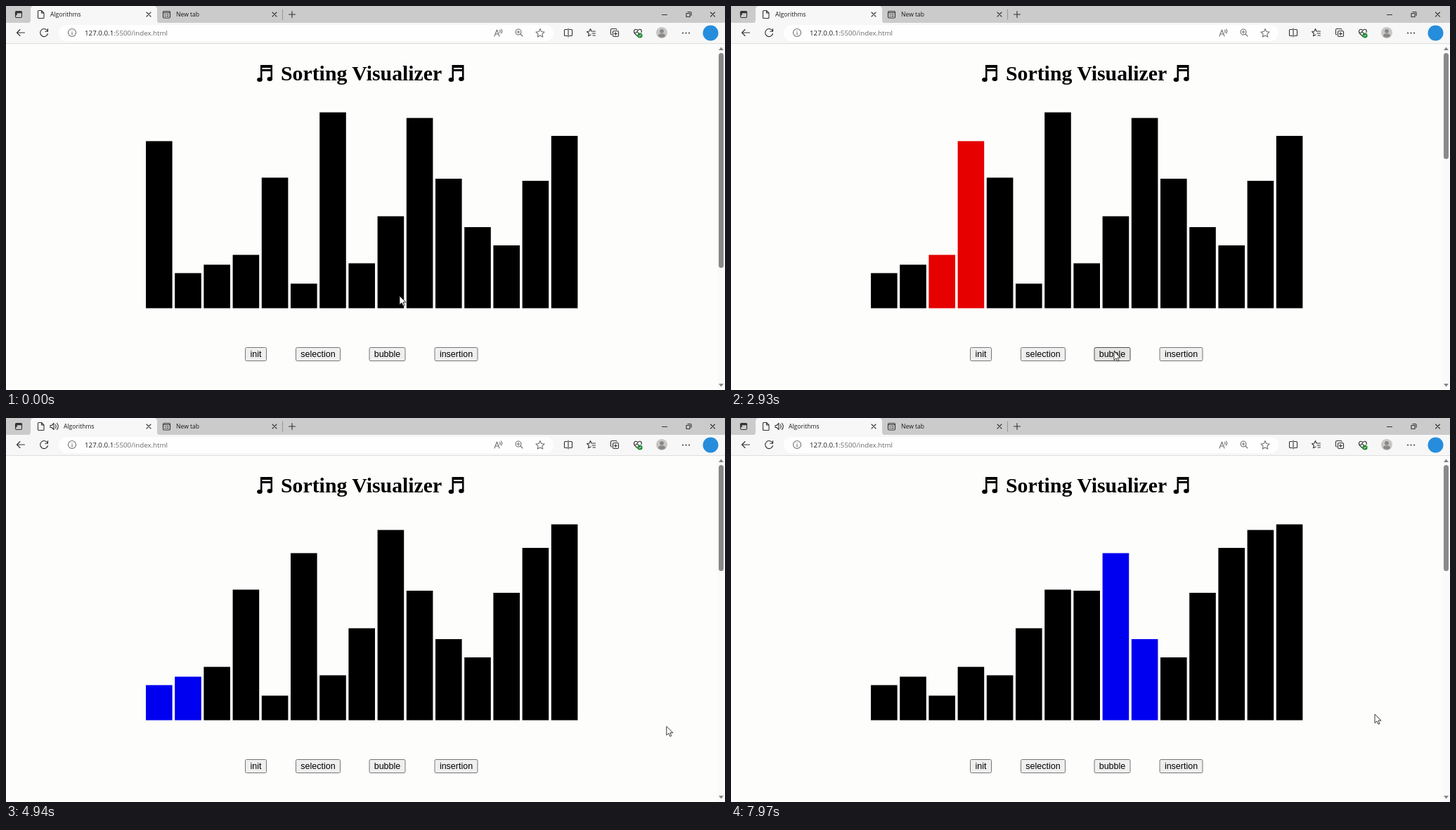
An HTML page for the animation above (8 s loop, 1023 px wide and 547 px high).

```html
<!DOCTYPE html>
<html lang="en">
<head>
<meta charset="utf-8">
<title>Sorting Visualizer</title>
<style>
  html, body { margin: 0; height: 100%; overflow: hidden; }
  svg { display: block; width: 1023px; height: 547px; background: #fdfdfc; }
  .ui { font-family: "Open Sans", "Noto Sans", sans-serif; font-size: 8.6px; fill: #1c1c1c; }
  .icon { fill: none; stroke: #333; stroke-width: 1.1; stroke-linecap: round; stroke-linejoin: round; }
  .soft { stroke: #707070; }
  h1, .title { font: bold 29.8px "Liberation Serif", "Times New Roman", serif; }
  .button rect { fill: #efefef; stroke: #767676; }
  .button text { font: 12.5px "Liberation Sans", Arial, sans-serif; text-anchor: middle; }
  .button.hover rect { fill: #e4e4e2; stroke: #4f4f4f; }
</style>
</head>
<body>
<svg viewBox="0 0 1023 547">
  <defs>
    <path id="cross" d="M-3-3L3 3M3-3L-3 3"/>
    <path id="star" d="M0-6L1.8-2L6-1.5L2.9 1.4L3.7 5.6L0 3.5L-3.7 5.6L-2.9 1.4L-6-1.5L-1.8-2Z"/>
    <g id="notes">
      <path d="M5 0H22V4H5ZM5 6H22V9H5ZM5 0H7.5V21H5ZM19.5 0H22V20H19.5Z"/>
      <ellipse cx="3.9" cy="21" rx="3.8" ry="3"/>
      <ellipse cx="18.3" cy="20" rx="3.8" ry="3"/>
    </g>
  </defs>

  <!-- tab strip -->
  <rect width="1023" height="25" fill="#cbcbcb"/>
  <rect y="24" width="1023" height="29" fill="#f7f7f7"/>
  <path d="M31 24.5Q35 24 35 20V5Q35 0 40 0H210Q215 0 215 5V20Q215 24 219 24.5Z" fill="#f7f7f7"/>
  <g class="icon">
    <rect x="13.5" y="7.5" width="9" height="9" rx="1.5"/>
    <path d="M14 9H22M14.5 9V12" stroke-width="2.4"/>
    <path d="M45.500 7.500Q45.500 6.500 46.500 6.500H50.500L54 10V16.500Q54 17.500 53 17.500H46.500Q45.500 17.500 45.500 16.500ZM50.500 6.500V10H54"/>
    <rect x="223.500" y="7.500" width="10" height="9.500" rx="1.500"/>
    <path d="M224 9.500H233M226 12H227M229 12H231M226 14.500H227M229 14.500H231"/>
    <use href="#cross" x="203" y="12"/>
    <use href="#cross" x="382" y="12"/>
    <path d="M402.500 12H411.500M407 7.500V16.500"/>
    <path d="M393.500 5V19" stroke="#999"/>
    <path d="M933.500 12.500H940.500M968 10.500H973V15.500H968ZM970 8.500H974Q975 8.500 975 9.500V13.500"/>
    <use href="#cross" x="1005.500" y="12"/>
  </g>
  <g class="ui">
    <text id="tabName" x="63" y="15">Algorithms</text>
    <text x="242" y="15">New tab</text>
  </g>
  <path id="speaker" class="icon" d="M63 10.500H65L68 7.500V16.500L65 13.500H63ZM70.500 9.500Q72 12 70.500 14.500M72.500 7.500Q76 12 72.500 16.500"/>

  <!-- toolbar -->
  <rect x="75" y="27" width="704" height="23" rx="11.500" fill="#fefefe"/>
  <path d="M0 53.500H1023" stroke="#dededc"/>
  <text class="ui" x="112" y="42" style="font-size:9.75px">127.0.0.1<tspan fill="#6a6a6a">:5500/index.html</tspan></text>
  <g class="icon">
    <path d="M26.500 38H15.500M20 33.500L15.500 38L20 42.500"/>
    <path d="M59.300 36A5.500 5.500 0 1 0 59.500 39.500M59.500 32.500V36.300H55.700"/>
    <g class="soft">
      <circle cx="94" cy="38" r="5.500"/>
      <path d="M94 37.500V41M94 35.300V35.400"/>
      <path d="M695 43L698.500 34L702 43M696.300 40H700.700M702.500 34.500Q704 36 702.500 38M704.500 33Q707 36 704.500 39"/>
      <circle cx="729" cy="37" r="4"/>
      <path d="M732 40L735 43M727 37H731M729 35V39"/>
      <use href="#star" x="760" y="38.500"/>
    </g>
    <path d="M798.500 33.500H795.500Q794.500 33.500 794.500 34.500V41.500Q794.500 42.500 795.500 42.500H798.500M801.500 33.500H804.500Q805.500 33.500 805.500 34.500V41.500Q805.500 42.500 804.500 42.500H801.500M800 32V44"/>
    <path d="M832 41L828.500 42.800L829.300 39L826.500 36.500L830 36L831.500 32.500L833 36H838.500M834 39H838.500M835 42H838.500"/>
    <rect x="863.500" y="35.500" width="8" height="8" rx="1.500"/>
    <path d="M861.500 41Q860.500 40.500 860.500 39.500V34Q860.500 32.500 862 32.500H867.500Q868.500 32.500 869 33.500M867.500 37.500V41.500M865.500 39.500H869.500"/>
    <path d="M898.500 43L894 38.500Q892.500 35.500 895 33.500Q897.500 32.500 899 35Q900.500 32.500 903 33.500Q905 35 904 37.500M894 38H897L898 36L900 39H901"/>
  </g>
  <circle cx="902" cy="42" r="3.600" fill="#218a35"/>
  <path d="M900.400 42L901.500 43.200L903.800 40.800" fill="none" stroke="#fff"/>
  <circle cx="933" cy="38" r="8" fill="#c9c7c5"/>
  <path d="M928 43Q928 39.500 931 39.500H935Q938 39.500 938 43Q933 47 928 43Z" fill="#8a8886"/>
  <circle cx="933" cy="35.800" r="2.900" fill="#8a8886"/>
  <path d="M963 38.500H963.100M967.500 38.500H967.600M972 38.500H972.100" stroke="#333" stroke-width="1.900" stroke-linecap="round"/>
  <circle cx="1002.500" cy="38.500" r="11" fill="#268ddc"/>

  <!-- page -->
  <use href="#notes" x="357" y="84"/>
  <text class="title" x="391" y="106">Sorting Visualizer</text>
  <use href="#notes" x="629.500" y="84"/>
  <g id="bars"></g>
  <g id="buttons"></g>

  <rect x="1012" y="54" width="11" height="493" fill="#fafafa"/>
  <path d="M1014 63L1017.500 58.500L1021 63ZM1014 538L1017.500 542.500L1021 538Z" fill="#858585"/>
  <rect id="thumb" x="1014" y="67" width="7" rx="3.500" fill="#898989"/>
  <path id="cursor" d="M0 0V12.500L3 9.800L5 14.200L7 13.300L5 9H9Z" fill="#fff" stroke="#222" stroke-width=".9"/>
</svg>
<script>
const LOOP = 8000, FIRST_MOVE = 2469, MOVE_TIME = 89, AUDIO_ON = 3200;
const BOTTOM = 430.5;
const heights = [238, 50, 62, 76, 186, 35, 279, 64, 131, 271, 184.5, 115.5, 89.5, 181.5, 245.5];
const pointer = [ // time, x, y
  [0, 560, 413], [1000, 546, 488], [1630, 546, 488], [2300, 545, 492], [3300, 545, 492],
  [4330, 829, 378], [4980, 941, 440], [5200, 936, 472], [5600, 916, 422]
];
const $ = id => document.getElementById(id);

function add(parent, tag, attrs) {
  const el = document.createElementNS("http://www.w3.org/2000/svg", tag);
  for (const key in attrs) el.setAttribute(key, attrs[key]);
  return parent.appendChild(el);
}

// Every comparison and every swap of a bubble sort is one visible step.
function bubbleSteps(source) {
  const a = [...source], steps = [];
  const show = (at, color) => steps.push({ values: [...a], at, color });
  let swapped;
  do {
    swapped = false;
    for (let i = 0; i < a.length - 1; i++) {
      show(i, "#0000f0");
      if (a[i] > a[i + 1]) {
        [a[i], a[i + 1]] = [a[i + 1], a[i]];
        swapped = true;
        show(i, "#e60000");
      }
    }
  } while (swapped);
  return steps;
}

const idle = { values: heights, at: -9 };
const steps = bubbleSteps(heights);
const bars = heights.map((_, i) => add($("bars"), "rect", { x: 199 + 41.2 * i, width: 37.6 }));

const [, , bubble] = [["init", 340.5, 30], ["selection", 412.5, 63], ["bubble", 517, 51], ["insertion", 610, 61]]
  .map(([label, x, width]) => {
    const g = add($("buttons"), "g", { class: "button" });
    add(g, "rect", { x, y: 486.5, width, height: 19, rx: 2 });
    add(g, "text", { x: x + width / 2, y: 500 }).textContent = label;
    return g;
  });

function pointerAt(t) {
  const next = pointer.findIndex(p => p[0] > t);
  if (next < 0) return pointer.at(-1).slice(1);
  const [from, to] = [pointer[next - 1], pointer[next]];
  const u = (t - from[0]) / (to[0] - from[0]);
  const ease = u * u * (3 - 2 * u);
  return [1, 2].map(i => from[i] + (to[i] - from[i]) * ease);
}

function draw(t) {
  const step = steps[Math.floor((t - FIRST_MOVE) / MOVE_TIME)] || idle;
  bars.forEach((bar, i) => {
    const height = step.values[i];
    bar.setAttribute("y", BOTTOM - height);
    bar.setAttribute("height", height);
    bar.setAttribute("fill", i === step.at || i === step.at + 1 ? step.color : "#000");
  });

  const [x, y] = pointerAt(t);
  $("cursor").setAttribute("transform", `translate(${x} ${y})`);
  bubble.classList.toggle("hover", x > 517 && x < 568 && y > 486 && y < 506);

  const audio = t >= AUDIO_ON;
  $("speaker").style.display = audio ? "" : "none";
  $("tabName").setAttribute("x", audio ? 82 : 63);
  $("thumb").setAttribute("height", t < FIRST_MOVE ? 306 : 151);
}

function tick() {
  draw(performance.now() % LOOP);
  requestAnimationFrame(tick);
}
tick();
</script>
</body>
</html>
```
